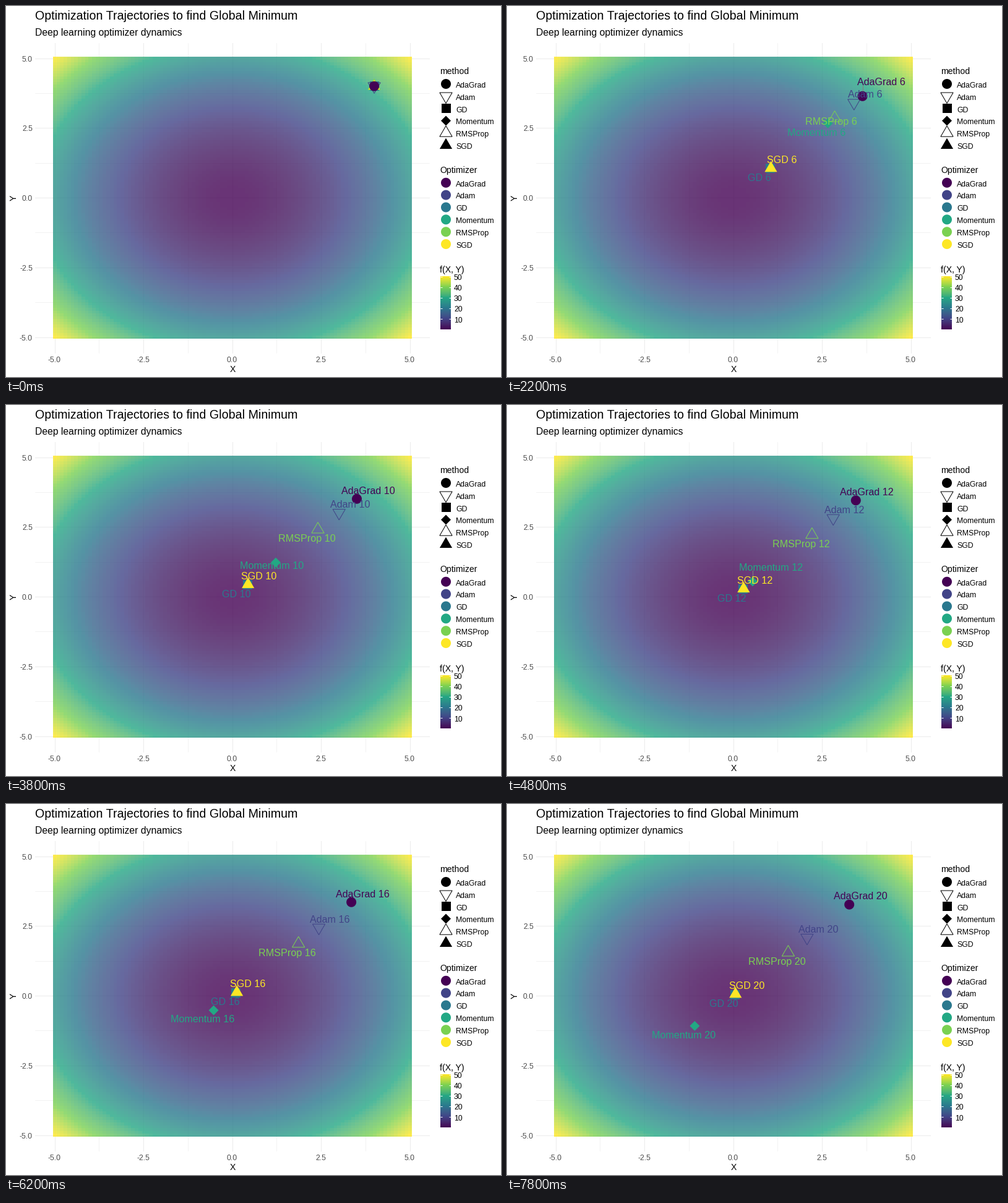
A matplotlib script for the animation above (8000 ms loop, 800x600 px).

```python
import numpy as np
import matplotlib.pyplot as plt
from matplotlib.animation import FuncAnimation
from matplotlib.colors import ListedColormap
from matplotlib.patches import Polygon

plt.rcParams["font.family"] = "Liberation Sans"

W, H, DPI = 800, 600, 100
PT = 72 / DPI
X0, Y0, SX, SY = 365.5, 310.1, 57.4, 45.1
STEPS = 20
GREY = "#4d4d4d"
NAMES = ["AdaGrad", "Adam", "GD", "Momentum", "RMSProp", "SGD"]
ORDER = ["GD", "SGD", "Momentum", "RMSProp", "Adam", "AdaGrad"]
SHAPES = dict(zip(NAMES, ["circle", "down", "square", "diamond", "up", "solid"]))
VIRIDIS = plt.cm.viridis(np.linspace(0, 1, 6))[:, :3]
COLORS = dict(zip(NAMES, VIRIDIS))

RGB_XYZ = np.array([[0.4124, 0.3576, 0.1805],
                    [0.2126, 0.7152, 0.0722],
                    [0.0193, 0.1192, 0.9505]])
WHITE = RGB_XYZ.sum(axis=1)


def lab_ramp(colors, n=256):
    """Blend the colors at equal distances in CIE Lab."""
    lin = np.where(colors > 0.04045, ((colors + 0.055) / 1.055) ** 2.4,
                   colors / 12.92)
    t = lin @ RGB_XYZ.T / WHITE
    f = np.where(t > 0.008856, np.cbrt(t), 7.787 * t + 16 / 116)
    # Lab is linear in f, so blending f is the same
    at = np.linspace(0, len(colors) - 1, n)
    f = np.column_stack([np.interp(at, range(len(colors)), ch) for ch in f.T])
    t = np.where(f > 0.2069, f ** 3, (f - 16 / 116) / 7.787)
    lin = np.clip((t * WHITE) @ np.linalg.inv(RGB_XYZ).T, 0, 1)
    return ListedColormap(np.where(lin > 0.0031308,
                                   1.055 * lin ** (1 / 2.4) - 0.055,
                                   12.92 * lin))


RAMP = lab_ramp(VIRIDIS)


def to_px(p):
    return np.array([X0, Y0]) + np.asarray(p) * [SX, -SY]


def descend(rule):
    """Path of one optimizer on f = x^2 + y^2 from (4, 4)."""
    path, p, state = [], np.array([4.0, 4.0]), {"m": 0.0, "v": 0.0}
    for k in range(STEPS + 1):
        path.append(p)
        p = p - rule(2 * p, state, k + 1)
    return np.array(path)


def gd(g, s, k):
    return 0.1 * g


def sgd(g, s, k):
    return 0.1 * g - np.array([0.004, 0.002])


def momentum(g, s, k):
    s["m"] = 0.9 * s["m"] + 0.01 * g
    return s["m"]


def adagrad(g, s, k):
    s["v"] = s["v"] + g ** 2
    return 0.1 * g / np.sqrt(s["v"])


def rmsprop(g, s, k):
    s["v"] = 0.9 * s["v"] + 0.1 * g ** 2
    return 0.1 * g / np.sqrt(s["v"])


def adam(g, s, k):
    s["m"] = 0.9 * s["m"] + 0.1 * g
    s["v"] = 0.999 * s["v"] + 0.001 * g ** 2
    return 0.1 * (s["m"] / (1 - 0.9 ** k)) / np.sqrt(s["v"] / (1 - 0.999 ** k))


RULES = dict(zip(NAMES, [adagrad, adam, gd, momentum, rmsprop, sgd]))
PATHS = {n: to_px(descend(RULES[n])) for n in NAMES}

# labels sit up and right of the point (1) or down and left (-1)
LEAN = dict(zip(NAMES, [1, 1, -1, -1, -1, 1]))


def place_labels(spots, texts):
    """Centres of the labels, pushed up and right until none overlap."""
    done = {}
    half = {n: 4.4 * len(texts[n]) for n in spots}
    for n in sorted(spots, key=lambda n: -spots[n][1]):
        c = spots[n] + LEAN[n] * np.array([18, -14])
        while any(abs(c[0] - d[0]) < half[n] + half[m] and abs(c[1] - d[1]) < 17
                  for m, d in done.items()):
            c = c + [6, -4.7]
        done[n] = c
    return done, half


def outline(kind):
    if kind == "circle":
        a = np.linspace(0, 2 * np.pi, 48, endpoint=False)
        return 8 * np.column_stack([np.cos(a), np.sin(a)])
    if kind == "square":
        return 7.5 * np.array([(-1, -1), (1, -1), (1, 1), (-1, 1)])
    if kind == "diamond":
        return 8 * np.array([(0, -1), (1, 0), (0, 1), (-1, 0)])
    tri = np.array([(0, -11.6), (10.1, 5.8), (-10.1, 5.8)])
    return tri * [1, -1] if kind == "down" else tri


def marker(kind, color, pos, z=3):
    hollow = kind in ("up", "down")
    return ax.add_patch(Polygon(
        outline(kind) + pos, closed=True, zorder=z, joinstyle="miter",
        fc="none" if hollow else color, ec=color if hollow else "none",
        lw=PT if hollow else 0))


def write(x, y, s, px, color="black", **kw):
    return ax.text(x, y, s, size=px * PT, color=color, **kw)


fig = plt.figure(figsize=(W / DPI, H / DPI), dpi=DPI, facecolor="white")
ax = fig.add_axes([0, 0, 1, 1])
ax.axis("off")

# panel grid
left, top = to_px((-5.555, 5.555))
right, bottom = to_px((5.555, -5.555))
for v in np.arange(-5, 5.1, 1.25):
    lw = (1 if v % 2.5 == 0 else 0.6) * PT
    px, py = to_px((v, v))
    ax.plot([px, px], [top, bottom], color="#ebebeb", lw=lw, zorder=0)
    ax.plot([left, right], [py, py], color="#ebebeb", lw=lw, zorder=0)
    if v % 2.5 == 0:
        write(px, 576, f"{v:.1f}", 12.2, GREY, ha="center")
        write(43, py + 5, f"{v:.1f}", 12.2, GREY, ha="right")

# surface
c = np.linspace(-5, 5, 101)
x_lo, y_hi = to_px((-5.05, 5.05))
x_hi, y_lo = to_px((5.05, -5.05))
ax.imshow(c[None, :] ** 2 + c[:, None] ** 2, cmap=RAMP, vmin=0, vmax=50,
          alpha=0.8, extent=(x_lo, x_hi, y_lo, y_hi), aspect="auto",
          interpolation="nearest", zorder=1)

# titles
write(47, 22, "Optimization Trajectories to find Global Minimum", 19.7)
write(47, 48, "Deep learning optimizer dynamics", 15.7)
write(366, 592, "X", 14, ha="center")
write(17, 310, "Y", 14, rotation=90, rotation_mode="anchor", ha="center")

# legends
write(701, 110, "method", 14)
write(701, 270, "Optimizer", 14)
write(701, 431, "f(X, Y)", 14)
for i, n in enumerate(NAMES):
    y = 126 + 19.85 * i
    marker(SHAPES[n], "black", (711, y))
    marker("circle", COLORS[n], (711, y + 159.8))
    write(727, y + 5.8, n, 12.2)
    write(727, y + 165.6, n, 12.2)

ax.imshow(np.linspace(1, 0, 256)[:, None], cmap=RAMP, aspect="auto",
          extent=(702, 719, 523, 437), zorder=2)
for i in range(5):
    y = 437.5 + 17.15 * i
    for x in (702, 715.6):
        ax.plot([x, x + 3.4], [y, y], color="white", lw=PT, zorder=3,
                solid_capstyle="butt")
    write(724, y + 5.5, str(50 - 10 * i), 12.2)
ax.set(xlim=(0, W), ylim=(H, 0))

# moving parts
points, tags, leads = {}, {}, {}
for z, n in enumerate(ORDER):
    points[n] = marker(SHAPES[n], COLORS[n], PATHS[n][0], 5 + z)
    tags[n] = write(0, 0, "", 16.1, COLORS[n], zorder=20, ha="center")
    leads[n], = ax.plot([], [], color="#7f7f7f", lw=PT, zorder=4)

KEYS = [round(1.9 * k) for k in range(STEPS + 1)]


def draw(i):
    tick = i if i < 20 else i - 1  # short rest halfway
    step = np.interp(tick, KEYS, range(STEPS + 1))
    number = int(step + 0.5)
    spots = {n: np.array([np.interp(step, range(STEPS + 1), axis)
                          for axis in PATHS[n].T]) for n in NAMES}
    texts = {n: f"{n} {number}" if step > 0 else "" for n in NAMES}
    centres, half = place_labels(spots, texts)
    for n, p in spots.items():
        points[n].set_xy(outline(SHAPES[n]) + p)
        x, y = centres[n]
        tags[n].set_position((x, y + 5.8))
        tags[n].set_text(texts[n])
        # line to the label when it is far from its point
        near = np.clip(p, [x - half[n], y - 6], [x + half[n], y + 6])
        far = step > 0 and np.hypot(*(near - p)) > 15
        leads[n].set_data([near[0], p[0]] if far else [],
                          [near[1], p[1]] if far else [])
    return [*points.values(), *tags.values(), *leads.values()]


anim = FuncAnimation(fig, draw, frames=40, interval=200, repeat=True,
                     repeat_delay=0, blit=False)
plt.show()
```
